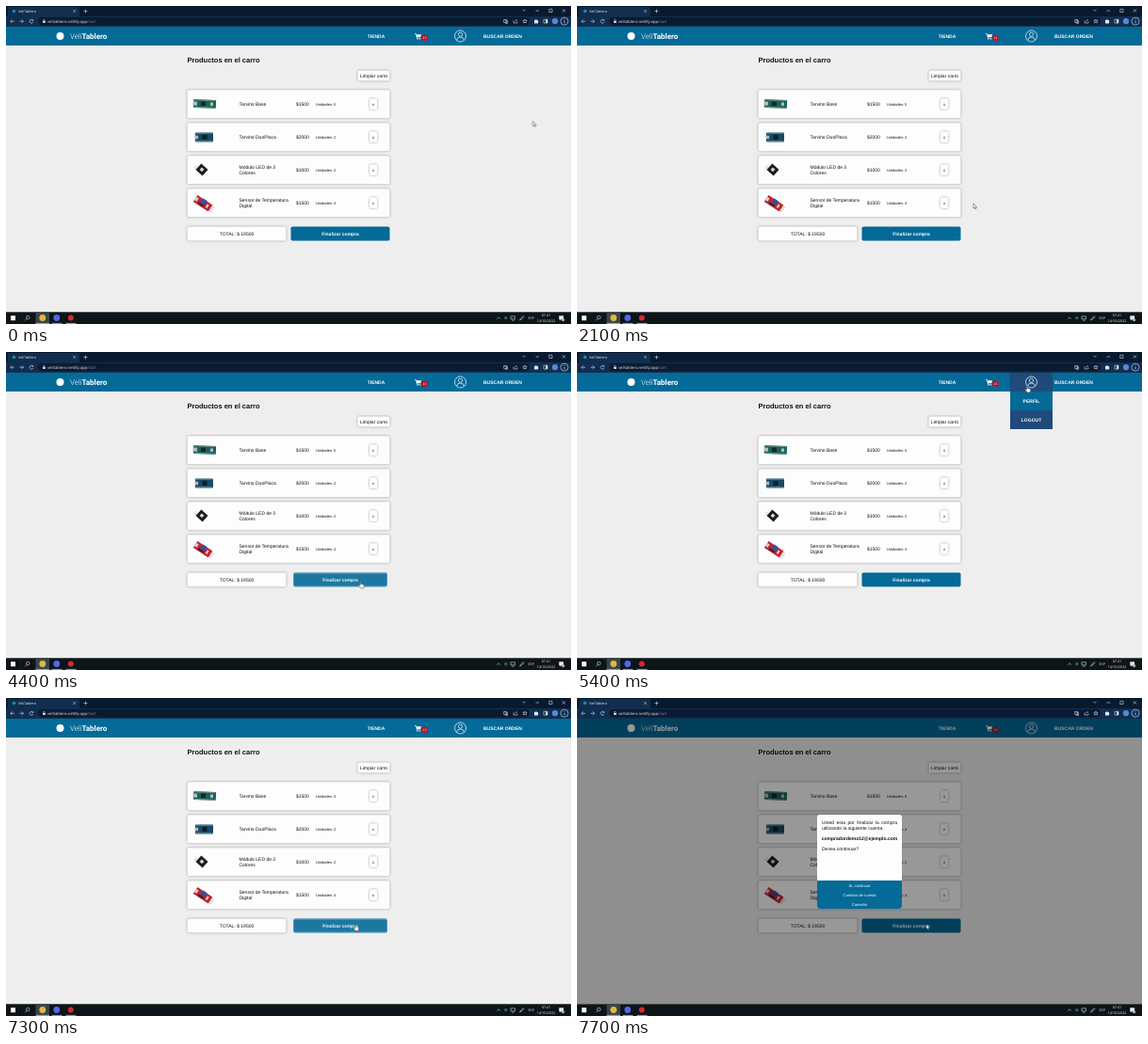
Animation of 600 by 338 pixels, one loop 8 s. Source, as an HTML page:

```html
<!DOCTYPE html>
<html lang="es">
<head>
<meta charset="utf-8">
<title>Carro</title>
<style>
html, body { margin: 0; height: 100%; overflow: hidden; background: #efeeef; }
svg { display: block; width: 100vw; height: 100vh; }
text { font: 5px "Liberation Sans", Arial, sans-serif; fill: #111; text-rendering: geometricPrecision; white-space: pre; }
.bold { font-weight: 700; }
.mid { text-anchor: middle; }
.white { fill: #fff; }
.ui { font-family: "Open Sans", sans-serif; fill: #e9edf2; }
.line { fill: none; stroke: #d5dde6; stroke-width: .6; }
.box { fill: #fdfdfd; filter: drop-shadow(0 0 .9px #0006); }
.blue { fill: #046a98; }

.cursor, .arrow, .hand, .buy, .menu, .dialog { animation: 8s step-end infinite; }
.cursor { animation-name: move; }
.arrow { animation-name: arrow; }
.hand { animation-name: hand; }
.menu { animation-name: menu; }
.dialog { animation-name: dialog; }
.buy { animation-name: buy; transform-box: fill-box; transform-origin: center; }

@keyframes move {
  0% { transform: translate(559.5px, 122.5px); }
  3.75% { transform: translate(559px, 122.5px); }
  6.25% { transform: translate(559px, 122.5px); animation-timing-function: steps(4); }
  11.25% { transform: translate(492px, 112px); animation-timing-function: steps(5); }
  17.5% { transform: translate(436.5px, 102.5px); animation-timing-function: steps(7); }
  26.25% { transform: translate(421px, 210px); }
  27.5% { transform: translate(420.5px, 224px); }
  28.75% { transform: translate(420.5px, 224px); animation-timing-function: steps(5); }
  35% { transform: translate(378px, 234px); animation-timing-function: steps(4); }
  40% { transform: translate(345px, 241px); }
  41.25% { transform: translate(347px, 242px); }
  42.5% { transform: translate(314px, 243px); }
  43.75% { transform: translate(355px, 242px); }
  45% { transform: translate(399px, 242px); }
  46.25% { transform: translate(350px, 243.5px); }
  55% { transform: translate(376.5px, 244px); }
  61.25% { transform: translate(376.5px, 244px); animation-timing-function: steps(5); }
  67.5% { transform: translate(478px, 36px); animation-timing-function: steps(4); }
  72.5% { transform: translate(500px, 72px); animation-timing-function: steps(3); }
  76.25% { transform: translate(468px, 84px); animation-timing-function: steps(4); }
  81.25% { transform: translate(378px, 238px); animation-timing-function: steps(2); }
  83.75% { transform: translate(373px, 240px); }
  87.5%, 100% { transform: translate(371px, 240.5px); }
}
@keyframes hand {
  0%, 62.5%, 77.5%, 92.5%, 100% { opacity: 0; }
  36.25%, 67.5%, 81.25% { opacity: 1; }
}
@keyframes arrow {
  0%, 62.5%, 77.5%, 92.5%, 100% { opacity: 1; }
  36.25%, 67.5%, 81.25% { opacity: 0; }
}
@keyframes menu {
  0%, 77.5%, 100% { opacity: 0; }
  67.5% { opacity: 1; }
}
@keyframes buy {
  0%, 35%, 61.25%, 65%, 80%, 92.5%, 96.25%, 100% { transform: none; opacity: 1; }
  38.75%, 83.75% { transform: scale(.952); opacity: .9; }
  35%, 61.25%, 80%, 91.25% { animation-timing-function: steps(3); }
  61.25%, 91.25% { transform: scale(.952); opacity: .9; }
}
@keyframes dialog {
  0% { opacity: 0; }
  91.25% { opacity: 0; animation-timing-function: steps(4); }
  96.25%, 100% { opacity: 1; }
}
</style>
</head>
<body>
<svg viewBox="0 0 600 338" preserveAspectRatio="none">
  <rect width="600" height="338" fill="#efeeef"/>

  <!-- browser -->
  <rect width="600" height="22" fill="#0a1a2e"/>
  <path d="M2 11V3q0-2 2-2H76q2 0 2 2v8H600V22H0V11Z" fill="#112e50"/>
  <rect x="34" y="12" width="522" height="8.5" rx="4.2" fill="#0a1b31"/>
  <circle cx="8.5" cy="5.5" r="1.8" fill="#1d8f9b"/>
  <text class="ui" x="13" y="7" style="font-size:3.75px">VeliTablero</text>
  <g class="line">
    <path d="m71.3 4.2 2.6 2.6m0-2.6-2.6 2.6M82.5 5.5h4m-2-2v4M548.5 3.8l1.5 1.5 1.5-1.5M562.5 5h3.6M576.8 3.3h3.2v3.2h-3.2ZM590.8 3.3l3.2 3.2m0-3.2-3.2 3.2"/>
    <path d="M8.8 16.3H4.8m1.8-1.8-1.8 1.8 1.8 1.8M14.5 16.3h4m-1.8-1.8 1.8 1.8-1.8 1.8M28.6 15.2a1.9 1.9 0 1 0 .2 1.8m0-2.8v1.3h-1.4"/>
    <path d="M39.6 16v-.8a.8.8 0 0 1 1.6 0v.8M528.7 14.5h3v3h-3Zm1.3 1.3h2.6v2.6H530M539 15.5v2.5h4v-1.5m-2.5-.2q.3-1.5 2.5-1.5M551 14l.6 1.4 1.6.1-1.2 1 .4 1.6-1.4-.9-1.4.9.4-1.6-1.2-1 1.6-.1ZM571 14.3h4v3.8h-4Z"/>
  </g>
  <path d="M39.1 16h2.6v2h-2.6ZM561 15h1.1a.8.8 0 0 1 1.6 0h1.2v1.2a.8.8 0 0 1 0 1.5v.8H561ZM573.2 14.3h1.8v3.8h-1.8Z" fill="#e1e7ee"/>
  <circle cx="583" cy="16.2" r="3.1" fill="#5688d8"/>
  <circle cx="593" cy="16.2" r="4" fill="#102c4d" stroke="#b9d3f2" stroke-width=".7"/>
  <path d="M593 14.3v.7m0 .8v2.4" stroke="#e2edf9" stroke-width=".7"/>
  <text class="ui" x="44" y="17.8" style="font-size:4.2px">velitablero.netlify.app<tspan fill="#8797a9">/cart</tspan></text>

  <!-- site header -->
  <rect class="blue" y="22" width="600" height="20"/>
  <circle class="white" cx="57.5" cy="32" r="4"/>
  <text class="white" x="68" y="34.7" style="font:300 8px Roboto,sans-serif">Veli<tspan font-weight="700">Tablero</tspan></text>
  <text class="white bold" x="383.7" y="33.8">TIENDA</text>
  <path class="white" d="M434 29.3h1.5l.3 1H441l-.8 3h-3.6l.1.6h3.5v.6h-4.1l-.9-4.6H434Z"/>
  <circle class="white" cx="437" cy="35.1" r=".6"/>
  <circle class="white" cx="439.8" cy="35.1" r=".6"/>
  <circle cx="444.4" cy="33.8" r="3.3" fill="#c40d1a"/>
  <text class="white mid" x="444.4" y="35" style="font-size:3.4px">13</text>
  <text class="white bold" x="507" y="33.8">BUSCAR ORDEN</text>
  <g class="menu">
    <path d="M460 22h45v60h-45Z" fill="#1f4a79"/>
    <path class="blue" d="M460 42h45v20h-45Z"/>
    <text class="white bold mid" x="482.5" y="53.8">PERFIL</text>
    <text class="white bold mid" x="482.5" y="73.8">LOGOUT</text>
  </g>
  <g fill="none" stroke="#fff" stroke-width=".7">
    <circle cx="482.5" cy="32" r="6"/>
    <circle cx="482.5" cy="30.2" r="2.1"/>
    <path d="M478.6 36.3q.2-3.2 3.9-3.2t3.9 3.2"/>
  </g>

  <!-- cart -->
  <text class="bold" x="192.5" y="60.4" style="font-size:7.5px">Productos en el carro</text>
  <rect class="box" x="373.5" y="68.5" width="34" height="11" rx="1.6"/>
  <text class="mid" x="390.5" y="75.8">Limpiar carro</text>
  <g id="rows"></g>
  <g transform="translate(211 104) rotate(2)">
    <rect x="-12" y="-4.5" width="24" height="9" rx=".8" fill="#16645f"/>
    <path d="M-11-3.8H11M-11 3.8H11" stroke="#c7b98a" stroke-width=".9" stroke-dasharray=".9 .7"/>
    <path d="M-12.5-2h4.5v4h-4.5ZM6-1.8h3v3.6H6Z" fill="#b5bcba"/>
    <path d="M-4-2.3h5v4.6h-5Z" fill="#182725"/>
  </g>
  <g transform="translate(210.5 139.5)">
    <rect x="-9.5" y="-5" width="19" height="10" rx=".8" fill="#164b68"/>
    <path d="M-8.5-4.2H9M-8.5 4.2H9" stroke="#bfc0aa" stroke-width=".9" stroke-dasharray=".9 .8"/>
    <path d="M-10-1.8h3.6v3.6H-10Z" fill="#aeb7bd"/>
    <path d="M-2-2.4h5v4.8h-5Z" fill="#101d29"/>
  </g>
  <g transform="translate(208 174) rotate(42)">
    <rect x="-4.8" y="-4.4" width="9.6" height="8.8" fill="#1b1b1d"/>
    <rect x="-1.8" y="-1.8" width="3.4" height="3.4" fill="#d9d9d4"/>
    <path d="M-4.8 3.4H-8m3.2-2H-8" stroke="#999" stroke-width=".5"/>
  </g>
  <g transform="translate(209.5 210) rotate(33)">
    <rect x="-10" y="-4.2" width="19" height="8.4" fill="#c3242f"/>
    <rect x="-3" y="-4.6" width="5" height="5" fill="#2456a6"/>
    <path d="M-10-2h3v4h-3ZM4-2h2v4H4Z" fill="#ddd3d5"/>
    <path d="M-5 1.2h7v2h-7Z" fill="#37232b"/>
    <path d="M9-2.4h3M9 0h3M9 2.4h3" stroke="#888" stroke-width=".6"/>
  </g>
  <rect class="box" x="192.5" y="234.5" width="105" height="15" rx="1.8"/>
  <text class="mid" x="245" y="243.8">TOTAL: $ 19500</text>
  <g class="buy">
    <rect class="blue" x="302.5" y="234.5" width="105" height="15" rx="1.8"/>
    <text class="white bold mid" x="355" y="243.8">Finalizar compra</text>
  </g>

  <!-- confirmation -->
  <g class="dialog">
    <rect y="22" width="600" height="303.5" fill="#000" opacity=".4"/>
    <rect x="255" y="124" width="90" height="100" rx="3" fill="#fdfdfd"/>
    <path class="blue" d="M255 194h90v27q0 3-3 3h-84q-3 0-3-3Z"/>
    <text x="260" y="133.8" style="word-spacing:1.1px">Usted esta por finalizar la compra</text>
    <text x="260" y="139.6">utilizando la siguiente cuenta:</text>
    <text class="bold mid" x="300" y="150.8">compradordemo12@ejemplo.com</text>
    <text x="260" y="161.8">Desea continuar?</text>
    <g id="choices"></g>
  </g>

  <!-- taskbar -->
  <rect y="325.3" width="600" height="12.7" fill="#0d1519"/>
  <rect x="31.5" y="325.3" width="14.5" height="12.7" fill="#39444a"/>
  <path d="M31.5 337.4h14.5M48.5 337.4h11M63.5 337.4h11" stroke="#79b4de" stroke-width="1"/>
  <rect class="white" x="5" y="329.2" width="5" height="5"/>
  <g class="line">
    <circle cx="23.2" cy="331" r="1.8"/>
    <path d="m22 332.4-1.8 1.9M521.3 332.6l1.8-1.8 1.8 1.8M536 329.8h4.5v3H536Zm1 4.4h2.5M545.6 334l1-1.8 2.6-2.6.8.8-2.6 2.6Z"/>
  </g>
  <circle cx="38.8" cy="331.5" r="3.4" fill="#e0b83d"/>
  <circle cx="53.8" cy="331.5" r="3.4" fill="#5865e8"/>
  <circle cx="68.8" cy="331.5" r="3" fill="#d42a2e"/>
  <circle cx="530.8" cy="331.6" r="1.8" fill="#1c6b4d"/>
  <g class="tray" style="font-size:4px">
    <text class="ui mid" x="557.7" y="333" style="font-size:3.75px">ESP</text>
    <text class="ui mid" x="573.5" y="330" style="font-size:3.75px">07:41</text>
    <text class="ui mid" x="573.5" y="336" style="font-size:3.75px">14/10/2022</text>
  </g>
  <path d="M587.3 329.3h4.8v4h-2.4l-1.2 1.3v-1.3h-1.2Z" fill="#e7eaec"/>
  <circle cx="591.6" cy="333.6" r="1.6" fill="#aab4ba"/>

  <g class="cursor" fill="#fff" stroke="#222" stroke-width=".45">
    <path class="arrow" d="M0 0V5.2L1.2 4.1 2 5.9 2.8 5.5 2 3.8H3.7Z"/>
    <path class="hand" d="M-.5.5a.55.55 0 0 1 1.1 0V2.6L3.2 3.2a.8.8 0 0 1 .6.8L3.3 7H0L-2 4.4a.5.5 0 0 1 .8-.6L-.5 4.4Z"/>
  </g>
</svg>
<script>
const products = [
  [["Tarvino Base"], 1500, 5],
  [["Tarvino DuoPlaca"], 2000, 2],
  [["Módulo LED de 3", "Colores"], 1000, 2],
  [["Sensor de Temperatura", "Digital"], 1500, 4],
];
const fill = (id, items, draw) =>
  document.getElementById(id).innerHTML = items.map(draw).join("");

fill("rows", products, ([lines, price, units], i) => {
  const y = 104 + 35 * i;
  const name = lines.map((line, n) =>
    `<text x="247.5" y="${y + 1.8 + 5.7 * (n - (lines.length - 1) / 2)}">${line}</text>`).join("");
  return `<rect class="box" x="192.5" y="${y - 14.8}" width="215" height="30" rx="1.8"/>${name}
    <text x="308" y="${y + 1.8}">$${price}</text>
    <text x="329" y="${y + 1.5}" style="font-size:4px">Unidades: ${units}</text>
    <rect class="box" x="385.9" y="${y - 5.8}" width="8.4" height="11.8" rx="1.8"/>
    <text class="mid" x="390.1" y="${y + 1.5}" style="font-size:4.17px">x</text>`;
});

fill("choices", ["Si, continuar", "Cambiar de cuenta", "Cancelar"], (label, i) =>
  `<text class="white mid" x="300" y="${200.5 + 10 * i}" style="font-size:4.17px">${label}</text>`);
</script>
</body>
</html>
```
